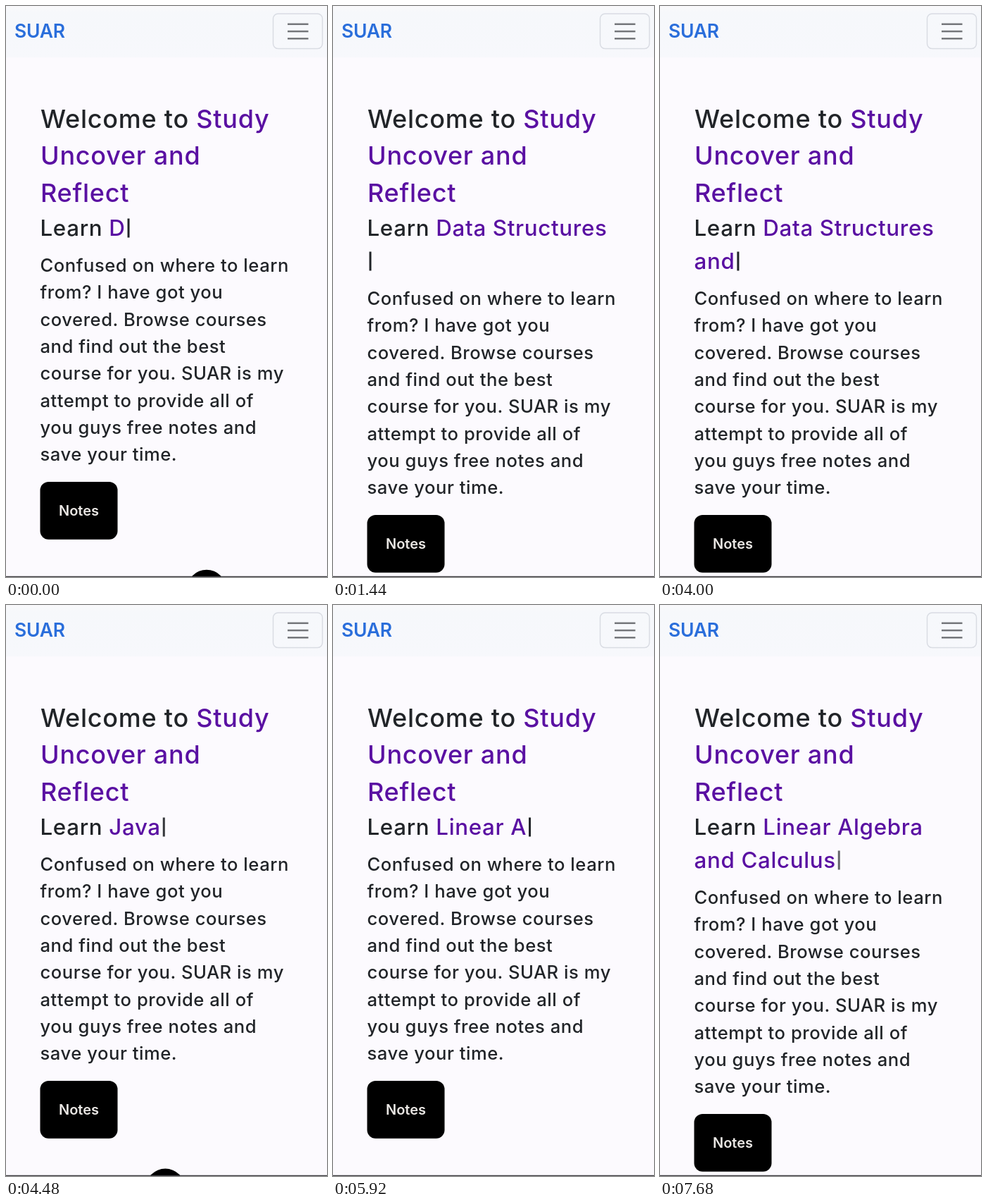
An HTML page that plays this animation: 456 px wide and 810 px high, repeating every 7.76 s.

```html
<!DOCTYPE html>
<html lang="en">
<head>
<meta charset="utf-8">
<title>Course notes</title>
<style>
  html, body { margin: 0; width: 100%; height: 100%; overflow: hidden; background: #fcfafe; }
  svg { display: block; width: 456px; height: 810px; }
  text { font-family: Inter, "Open Sans", sans-serif; font-weight: 500; letter-spacing: .021em; white-space: pre; fill: #212428; }
  .accent { fill: #5a10a2; }
  .title { font-size: 36px; }
  .typed { font-size: 31.3px; }
  .body { font-size: 25.6px; }
</style>
</head>
<body>
<svg viewBox="0 0 456 810">
  <defs>
    <linearGradient id="bar" x2="0" y2="1">
      <stop offset="0" stop-color="#f9f9fb"/>
      <stop offset=".15" stop-color="#f6f8fb"/>
      <stop offset="1" stop-color="#f7f8fc"/>
    </linearGradient>
  </defs>
  <rect width="456" height="810" fill="#fcfafe"/>
  <rect width="456" height="73" fill="url(#bar)"/>
  <text x="12" y="45" style="font-size:26.5px;font-weight:600;fill:#2a6edb;letter-spacing:-.01em">SUAR</text>
  <rect x="379.5" y="11" width="70" height="49.5" rx="7" fill="none" stroke="#d9dce3" stroke-width="1.5"/>
  <path d="M400 25.7h29.5M400 36h29.5M400 46.3h29.5" stroke="#75777b" stroke-width="2.6"/>

  <g class="title">
    <text x="49" y="172.5">Welcome to <tspan class="accent">Study</tspan></text>
    <text x="49" y="225" class="accent">Uncover and</text>
    <text x="49" y="277.5" class="accent">Reflect</text>
  </g>
  <g class="typed">
    <text id="line1" x="48.5" y="326">Learn <tspan id="word" class="accent"></tspan></text>
    <text id="line2" x="48.5" y="373" class="accent"></text>
  </g>
  <rect id="cursor" width="3" height="27" fill="#212428"/>

  <circle id="ball" r="28"/>
  <g id="flow">
    <g id="para" class="body"></g>
    <rect x="48.5" y="675" width="110" height="81.7" rx="12"/>
    <text x="103.5" y="723" text-anchor="middle" style="font-size:20px;font-weight:600;letter-spacing:0;fill:#e9e6e3">Notes</text>
  </g>
  <rect y="808.8" width="456" height="1.2" fill="#3c3c40"/>
</svg>
<script>
const LOOP = 7760, LINE = 47, BLINK = 700, ERASE_STEP = 4;
const $ = id => document.getElementById(id);

// cut: where the second line begins; wrap: length at which it breaks
const phrases = [
  { text: 'Data Structures and countless more', start: -40, step: 97, erase: 3940, cut: 16, wrap: 16 },
  { text: 'Java', start: 4159, step: 97, erase: 5150, cut: 99, wrap: 99 },
  { text: 'Linear Algebra and Calculus', start: 5220, step: 90.5, erase: Infinity, cut: 15, wrap: 17 }
];

const paragraph = ['Confused on where to learn', 'from? I have got you', 'covered. Browse courses',
  'and find out the best', 'course for you. SUAR is my', 'attempt to provide all of',
  'you guys free notes and', 'save your time.'];
$('para').innerHTML = paragraph
  .map((s, i) => `<text x="48.5" y="${377 + i * 38.3}">${s}</text>`).join('');

const clamp = (v, lo, hi) => Math.max(lo, Math.min(hi, v));
const blink = elapsed => Math.abs(1 - elapsed % BLINK / (BLINK / 2));

function draw(t) {
  const p = phrases.findLast((q, i) => !i || t >= phrases[i - 1].erase + phrases[i - 1].text.length * ERASE_STEP);
  const size = p.text.length;
  const typed = clamp(1 + Math.floor((t - p.start) / p.step), 0, size);
  const erased = t < p.erase ? 0 : Math.floor((t - p.erase) / ERASE_STEP);
  const count = Math.max(0, typed - erased);
  const wrapped = count >= p.wrap;
  const shown = p.text.slice(0, count);

  $('word').textContent = wrapped ? shown.slice(0, p.cut) : shown;
  $('line2').textContent = wrapped ? shown.slice(p.cut) : '';
  const width = $(wrapped ? 'line2' : 'line1').getComputedTextLength();
  $('cursor').setAttribute('x', 51.5 + width);
  $('cursor').setAttribute('y', wrapped ? 348.5 : 301.5);
  const resting = typed === size && t < p.erase;
  $('cursor').setAttribute('opacity', resting ? blink(t - p.start - (size - 1) * p.step) : 1);

  const shift = wrapped ? LINE : 0;
  $('flow').setAttribute('transform', `translate(0 ${shift})`);

  // the ball circles below the fold, its top edge peeking in
  const a = (29.3 + t * .0673) * Math.PI / 180;
  $('ball').setAttribute('cx', 255.5 + 60 * Math.sin(a));
  $('ball').setAttribute('cy', 880 + shift - 60 * Math.cos(a));
}

const begin = performance.now();
function frame() {
  draw((performance.now() - begin) % LOOP);
  requestAnimationFrame(frame);
}
frame();
</script>
</body>
</html>
```
